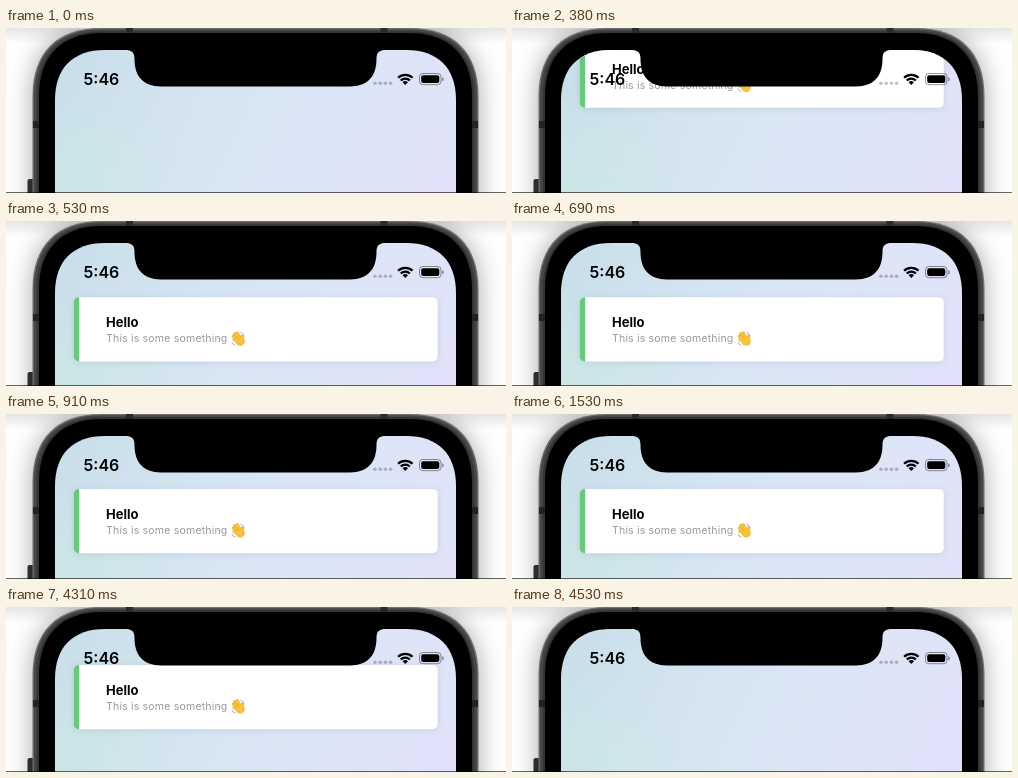
Recreate the animation shown at these times as an HTML page with a canvas. Size 500 px wide and 165 px high, loop 4810 ms.

```html
<!DOCTYPE html>
<html lang="en">
<head>
<meta charset="utf-8">
<title>Notification banner</title>
<style>
  html, body { margin: 0; width: 100%; height: 100%; overflow: hidden; background: #fff; }
  canvas { display: block; width: 500px; height: 165px; }
</style>
</head>
<body>
<canvas id="stage"></canvas>
<script>
const W = 500, H = 165, LOOP = 4810;
const canvas = document.getElementById('stage');
const ctx = canvas.getContext('2d');
const dpr = window.devicePixelRatio || 1;
canvas.width = W * dpr;
canvas.height = H * dpr;

// Card top over time: [ms, y]
const ENTER = [[310, -46], [340, -17], [373, 16], [404, 42], [435, 62], [466, 70.5],
  [497, 74.5], [560, 77], [685, 76.2], [810, 75.3], [910, 75]];
const LEAVE = [[4280, 58], [4312, 34], [4344, 8], [4376, -20], [4408, -42], [4530, -80]];

// Smooth curve through the points
function along(points, t) {
  const last = points.length - 1;
  if (t <= points[0][0]) return points[0][1];
  if (t >= points[last][0]) return points[last][1];
  let i = 0;
  while (t >= points[i + 1][0]) i++;
  const slope = k => {
    const a = points[Math.max(k - 1, 0)], b = points[Math.min(k + 1, last)];
    return (b[1] - a[1]) / (b[0] - a[0]);
  };
  const [t0, y0] = points[i], [t1, y1] = points[i + 1];
  const d = t1 - t0, u = (t - t0) / d, v = 1 - u;
  return y0 * v * v * (1 + 2 * u) + y1 * u * u * (3 - 2 * u)
    + d * u * v * (slope(i) * v - slope(i + 1) * u);
}

const hold = (t, start, step) => start + Math.floor((t - start) / step) * step;

function cardTop(t) {
  if (t < 310 || t >= 4530) return null;
  if (t < 4280) return along(ENTER, hold(t, 310, 31.25));
  return along(LEAVE, hold(t, 4280, 32));
}

function box(x, y, w, h, r, fill) {
  ctx.beginPath();
  ctx.roundRect(x, y, w, h, r);
  ctx.fillStyle = fill;
  ctx.fill();
}

// Open-bottomed body with continuous-curvature corners of extent e
function bodyPath(x, y, w, e) {
  const r = x + w, c = e * .36;
  ctx.beginPath();
  ctx.moveTo(x, H + 40);
  ctx.lineTo(x, y + e);
  ctx.bezierCurveTo(x, y + c, x + c, y, x + e, y);
  ctx.lineTo(r - e, y);
  ctx.bezierCurveTo(r - c, y, r, y + c, r, y + e);
  ctx.lineTo(r, H + 40);
  ctx.closePath();
}

function body(inset, top, e, fill) {
  bodyPath(26.5 + inset, top, 446 - 2 * inset, e);
  ctx.fillStyle = fill;
  ctx.fill();
}

function line(x0, y0, x1, y1, width, color) {
  ctx.beginPath();
  ctx.moveTo(x0, y0);
  ctx.lineTo(x1, y1);
  ctx.lineWidth = width;
  ctx.strokeStyle = color;
  ctx.stroke();
}

function dot(x, y, r, color) {
  ctx.beginPath();
  ctx.arc(x, y, r, 0, 7);
  ctx.fillStyle = color;
  ctx.fill();
}

function label(text, x, y, font, color, spacing = 0) {
  ctx.font = font + ' Inter, "Liberation Sans", sans-serif';
  ctx.letterSpacing = spacing + 'px';
  ctx.fillStyle = color;
  ctx.fillText(text, x, y);
}

function gradient(x0, y0, x1, y1, ...stops) {
  const g = ctx.createLinearGradient(x0, y0, x1, y1);
  stops.forEach((c, i) => g.addColorStop(i / (stops.length - 1), c));
  return g;
}

function phone() {
  ctx.fillStyle = '#fff';
  ctx.fillRect(0, 0, W, H);
  ctx.fillStyle = gradient(0, 0, 0, 16, 'rgba(0,0,0,.1)', 'rgba(0,0,0,0)');
  ctx.fillRect(0, 0, W, 16);

  box(21.5, 151, 8, 30, 2, '#353537');
  ctx.save();
  ctx.shadowColor = 'rgba(0,0,0,.34)';
  ctx.shadowBlur = 24 * dpr;
  body(0, 0, 68, '#6f6f71');
  ctx.restore();
  body(1.3, 1.2, 67, '#464648');
  body(4.2, 3.2, 65, '#343436');
  for (const x of [27, 466]) box(x, 93, 6, 7, 0, '#222224');
  for (const x of [120, 374.5]) box(x, 0, 7, 5, 0, '#2a2a2c');
  body(6.5, 5, 63, '#000');
}

function wallpaper() {
  ctx.fillStyle = gradient(70, 20, 420, 190, '#c9dfe9', '#d2e3ee', '#d9e6f4', '#dde5f7', '#e1e2f9');
  ctx.fillRect(49, 22, 401, 143);
  const mint = ctx.createRadialGradient(60, 180, 0, 60, 180, 120);
  mint.addColorStop(0, 'rgba(203,233,230,.8)');
  mint.addColorStop(1, 'rgba(203,233,230,0)');
  ctx.fillStyle = mint;
  ctx.fillRect(49, 22, 401, 143);
}

// Waving hand in a 16 px box
function hand(x, y) {
  ctx.save();
  ctx.translate(x, y);
  ctx.lineCap = 'round';
  const fingers = [[7, 10.8, 3.2, 9], [7.5, 9.5, 2.4, 5.6], [8.7, 8.5, 3.8, 3.1],
    [10, 8, 6.4, 2.3], [11.6, 10, 12, 5.2]];
  fingers.forEach(f => line(...f, 2.9, '#dc9a24'));
  dot(9.4, 10.4, 4.5, '#dc9a24');
  fingers.forEach(f => line(...f, 2.1, '#fcc63c'));
  dot(9.4, 10.4, 4.1, '#fcc237');
  line(6.5, 8.8, 4.4, 6.8, .5, '#dc9a24');
  line(8, 7.6, 5.7, 4.9, .5, '#dc9a24');
  ctx.lineWidth = .8;
  ctx.strokeStyle = '#8fa5b3';
  for (const [cx, cy, from] of [[9.3, 4.8, -1.4], [4.6, 11.2, 1.7]]) {
    ctx.beginPath();
    ctx.arc(cx, cy, 3.3, from, from + 1.3);
    ctx.stroke();
  }
  ctx.restore();
}

function card(y) {
  ctx.save();
  ctx.shadowColor = 'rgba(50,60,100,.13)';
  ctx.shadowBlur = 7 * dpr;
  ctx.shadowOffsetY = dpr;
  box(67.7, y, 364, 64.2, 5, '#fff');
  ctx.restore();
  box(67.7, y, 5.5, 64.2, [5, 0, 0, 5], '#67c97a');
  label('Hello', 100, y + 30.2, '700 13px', '#050505');
  label('This is some something', 100, y + 45, '400 10.6px', '#999', .15);
  hand(224.8, y + 33.5);
}

function notch() {
  ctx.beginPath();
  ctx.moveTo(119, 21);
  ctx.lineTo(119, 22);
  ctx.bezierCurveTo(126, 22, 128.5, 24.5, 128.5, 31);
  ctx.bezierCurveTo(128.5, 48, 137, 58.4, 155, 58.4);
  ctx.lineTo(344, 58.4);
  ctx.bezierCurveTo(362, 58.4, 370.5, 48, 370.5, 31);
  ctx.bezierCurveTo(370.5, 24.5, 373, 22, 380, 22);
  ctx.lineTo(380, 21);
  ctx.fillStyle = '#000';
  ctx.fill();
}

function wifi(x, y) {
  const a = -Math.PI * .75, b = -Math.PI * .25;
  ctx.strokeStyle = '#000';
  ctx.lineWidth = 2.3;
  for (const r of [6.4, 10.2]) {
    ctx.beginPath();
    ctx.arc(x, y, r, a, b);
    ctx.stroke();
  }
  ctx.beginPath();
  ctx.moveTo(x, y);
  ctx.arc(x, y, 3.8, a, b);
  ctx.fillStyle = '#000';
  ctx.fill();
}

function statusBar() {
  label('5:46', 77.5, 56.8, '600 16px', '#000');
  for (let i = 0; i < 4; i++) dot(369 + i * 5.2, 55.2, 1.8, 'rgba(0,0,0,.24)');
  wifi(399.3, 57);
  ctx.beginPath();
  ctx.roundRect(413.5, 45.5, 21.5, 11.2, 3.3);
  ctx.lineWidth = 1;
  ctx.strokeStyle = 'rgba(0,0,0,.42)';
  ctx.stroke();
  box(415.2, 47.2, 18.1, 7.8, 2, '#000');
  box(436.2, 49.2, 1.5, 4, [0, 1.5, 1.5, 0], 'rgba(0,0,0,.42)');
}

function draw(t) {
  ctx.setTransform(dpr, 0, 0, dpr, 0, 0);
  phone();
  ctx.save();
  bodyPath(49, 22, 401, 50);
  ctx.clip();
  wallpaper();
  const y = cardTop(t);
  if (y !== null) card(y);
  statusBar();
  ctx.restore();
  notch();
  box(0, 164, W, 1, 0, 'rgba(0,0,0,.6)');
}

const start = performance.now();
function tick() {
  draw((performance.now() - start) % LOOP);
  requestAnimationFrame(tick);
}
tick();
</script>
</body>
</html>
```
